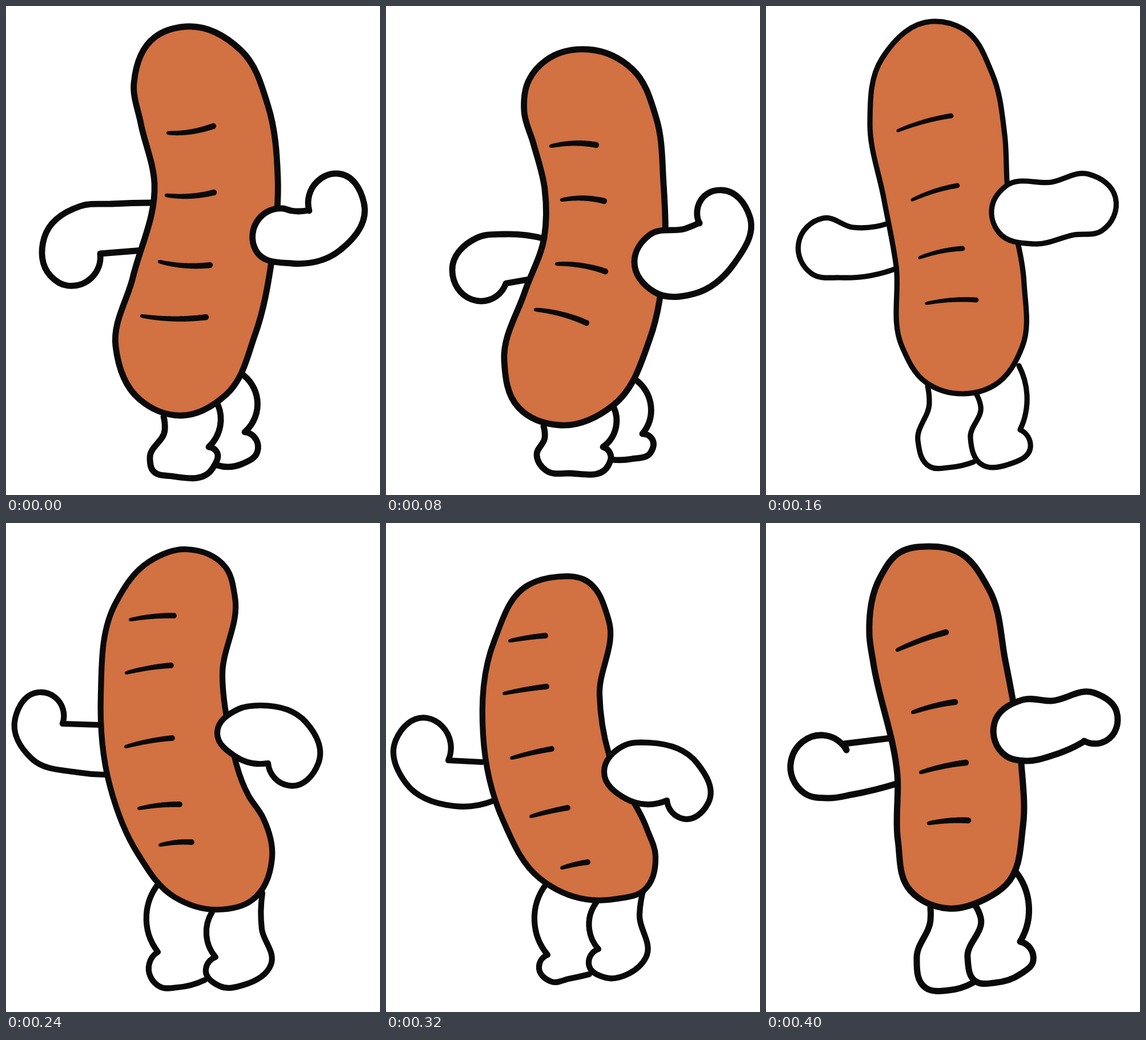
Write an HTML page with a canvas that moves like this. It is 655 by 855 pixels and loops after 480 ms.

```html
<!DOCTYPE html>
<html lang="en">
<head>
<meta charset="utf-8">
<title>Dancing sausage</title>
<style>
html, body { margin: 0; height: 100%; overflow: hidden; background: #fff; }
canvas { display: block; }
</style>
</head>
<body>
<canvas id="stage" width="655" height="855"></canvas>
<script>
const ctx = document.getElementById('stage').getContext('2d');
const INK = '#0a0a0a', SKIN = '#d27142', STEP = 80;

// Key points are joined by smooth arcs; "/" makes a corner, "z" closes the loop.
// Each mark is a start and an end point; sag bends all marks of a pose.
const poses = [
  {
    ink: 10.8, sag: 4,
    limbs: [
      '256,344 185,346 130,350 67,405 78,472 108,489 165,433 / 240,427',
      '411,642 440,688 418,745 / 438,758 440,780 415,800 370,803',
      '276,718 278,742 252,790 257,812 290,822 362,808 368,778 355,771 / 375,735 371,697'
    ],
    body: '315,36 412,78 459,175 476,300 466,440 436,575 385,680 308,716 233,687 192,595 222,475 260,310 236,205 224,135 260,55 z',
    arm: '531,358 545,307 580,293 627,345 585,427 500,450 438,428 443,372 485,354 500,358 530,357',
    marks: '284,222 363,210  281,331 364,326  269,447 357,453  238,542 350,544'
  },
  {
    ink: 10.8, sag: -4,
    limbs: [
      '278,407 205,399 160,405 116,462 150,513 180,514 210,485 / 256,477',
      '435,652 464,700 449,748 / 466,757 464,780 430,792 395,793',
      '276,735 278,755 264,785 280,812 320,817 390,802 394,788 380,771 / 403,735 399,702'
    ],
    body: '355,76 432,111 473,195 486,310 487,450 462,582 398,698 306,733 232,702 207,620 243,500 277,405 278,320 258,240 242,185 250,130 280,95 z',
    arm: '549,380 563,328 588,322 637,368 610,450 540,503 470,500 435,447 462,400 525,389 549,379',
    marks: '289,245 368,243  308,339 382,341  299,451 384,464  262,531 351,554'
  },
  {
    ink: 9.2, sag: -3,
    limbs: [
      '214,380 152,387 100,371 57,415 80,468 130,475 228,459',
      '283,664 286,695 266,760 288,806 320,807 364,797',
      '368,678 376,700 358,755 380,803 420,803 463,765 445,741 / 457,680 443,629'
    ],
    body: '290,27 345,40 396,118 418,225 423,320 452,485 449,595 400,663 345,678 280,658 238,595 228,455 206,335 182,205 203,92 z',
    arm: '420,315 500,308 565,294 612,335 588,393 540,400 470,416 408,396 396,350 z',
    marks: '231,218 324,192  256,339 335,314  269,440 344,424  281,520 368,514'
  },
  {
    ink: 10.2, sag: -2,
    limbs: [
      '163,353 99,351 / 85,304 58,296 16,342 45,412 125,436 172,440',
      '266,632 246,685 266,750 / 251,770 270,811 300,812 348,799',
      '361,680 351,720 367,759 / 350,780 375,810 415,808 464,772 448,710 449,647'
    ],
    body: '315,46 385,78 401,130 379,265 390,360 425,477 450,515 466,585 430,660 370,676 295,654 230,577 182,460 166,300 192,140 250,68 z',
    arm: '459,420 400,407 370,368 408,325 445,319 525,348 547,420 495,459 459,420',
    marks: '218,169 294,162  211,262 289,249  210,391 291,376  233,499 304,492  270,563 325,558'
  },
  {
    ink: 10.2, sag: -1,
    limbs: [
      '168,418 109,415 / 98,355 72,341 17,380 35,455 120,495 187,486',
      '280,632 260,695 283,755 / 268,775 290,802 320,797 356,789',
      '368,664 356,710 372,745 / 355,770 385,795 425,788 455,760 444,685 451,640'
    ],
    body: '300,94 345,98 390,170 374,300 390,403 457,535 472,582 452,642 405,657 350,658 270,622 205,520 170,370 190,205 250,108 z',
    arm: '492,485 420,482 382,435 415,390 460,384 545,420 564,490 520,517 492,485',
    marks: '217,206 279,197  207,298 281,286  220,411 290,395  254,513 318,498  308,603 353,593'
  },
  {
    ink: 11, sag: -2,
    limbs: [
      '219,376 137,386 / 141,397 / 100,371 44,415 68,473 110,481 150,475 228,456',
      '288,672 288,695 264,760 280,813 320,817 362,804',
      '366,668 376,690 353,760 368,802 400,804 445,789 468,765 445,732 / 460,665 436,608'
    ],
    body: '285,41 335,50 390,115 419,240 447,420 450,530 420,633 385,657 320,674 253,643 231,555 230,440 188,245 181,195 200,95 235,51 z',
    arm: '557,381 595,381 614,330 575,297 500,311 450,309 400,350 420,407 455,416 500,407 557,382',
    marks: '230,222 315,191  257,331 331,313  271,436 350,419  285,525 354,520'
  }
];

const points = text => text.match(/\d+,\d+/g).map(p => p.split(',').map(Number));
const wrap = a => Math.atan2(Math.sin(a), Math.cos(a));

// Adds a curve that follows the circle through each three neighbouring points.
function addCurve(path, pts, closed) {
  const chords = pts.slice(1).map(([x, y], i) => {
    const dx = x - pts[i][0], dy = y - pts[i][1];
    return { len: Math.hypot(dx, dy), dir: Math.atan2(dy, dx) };
  });
  const last = chords.length;
  const blend = (a, b) => a.dir + wrap(b.dir - a.dir) * a.len / (a.len + b.len);
  const tangents = pts.map((_, i) => {
    if (i > 0 && i < last) return blend(chords[i - 1], chords[i]);
    if (closed) return blend(chords[last - 1], chords[0]);
  });
  if (!closed) {
    const mirror = (c, t = c.dir) => 2 * c.dir - t;
    tangents[0] = mirror(chords[0], tangents[1]);
    tangents[last] = mirror(chords[last - 1], last > 1 ? tangents[last - 1] : undefined);
  }
  chords.forEach(({ len, dir }, i) => {
    const handle = t => len * 2 / 3 / (1 + Math.cos(t - dir));
    const [x0, y0] = pts[i], [x1, y1] = pts[i + 1], s = tangents[i], e = tangents[i + 1];
    const a = handle(s), b = handle(e);
    path.bezierCurveTo(x0 + a * Math.cos(s), y0 + a * Math.sin(s),
      x1 - b * Math.cos(e), y1 - b * Math.sin(e), x1, y1);
  });
}

function outline(text) {
  const path = new Path2D(), closed = text.endsWith('z');
  let end;
  for (const part of text.split('/')) {
    const pts = points(part);
    if (end) pts.unshift(end);
    else path.moveTo(...pts[0]);
    if (closed) pts.push(pts[0]);
    addCurve(path, pts, closed);
    end = pts.at(-1);
  }
  if (closed) path.closePath();
  return path;
}

// Brush strokes that swell from a thin start.
function brush({ marks, sag, ink }) {
  const path = new Path2D(), pts = points(marks);
  for (let i = 0; i < pts.length; i += 2) {
    const [[x0, y0], [x1, y1]] = pts.slice(i, i + 2);
    for (let t = 0; t <= 1; t += 1 / 64) {
      const x = x0 + (x1 - x0) * t, r = ink * (0.28 + 0.2 * Math.sqrt(t));
      const y = y0 + (y1 - y0) * t + 4 * sag * t * (1 - t);
      path.moveTo(x + r, y);
      path.arc(x, y, r, 0, 7);
    }
  }
  return path;
}

const drawings = poses.map(p => ({
  ink: p.ink,
  limbs: p.limbs.map(outline),
  body: outline(p.body),
  arm: outline(p.arm),
  marks: brush(p)
}));

function paint(path, color) {
  ctx.fillStyle = color;
  ctx.fill(path);
  ctx.stroke(path);
}

function draw({ ink, limbs, body, arm, marks }) {
  ctx.clearRect(0, 0, 655, 855);
  ctx.strokeStyle = INK;
  ctx.lineWidth = ink;
  ctx.lineCap = ctx.lineJoin = 'round';
  limbs.forEach(limb => ctx.stroke(limb));
  paint(body, SKIN);
  paint(arm, '#fff');
  ctx.fillStyle = INK;
  ctx.fill(marks);
}

function tick() {
  draw(drawings[Math.floor(performance.now() / STEP) % drawings.length]);
  requestAnimationFrame(tick);
}
tick();
</script>
</body>
</html>
```
